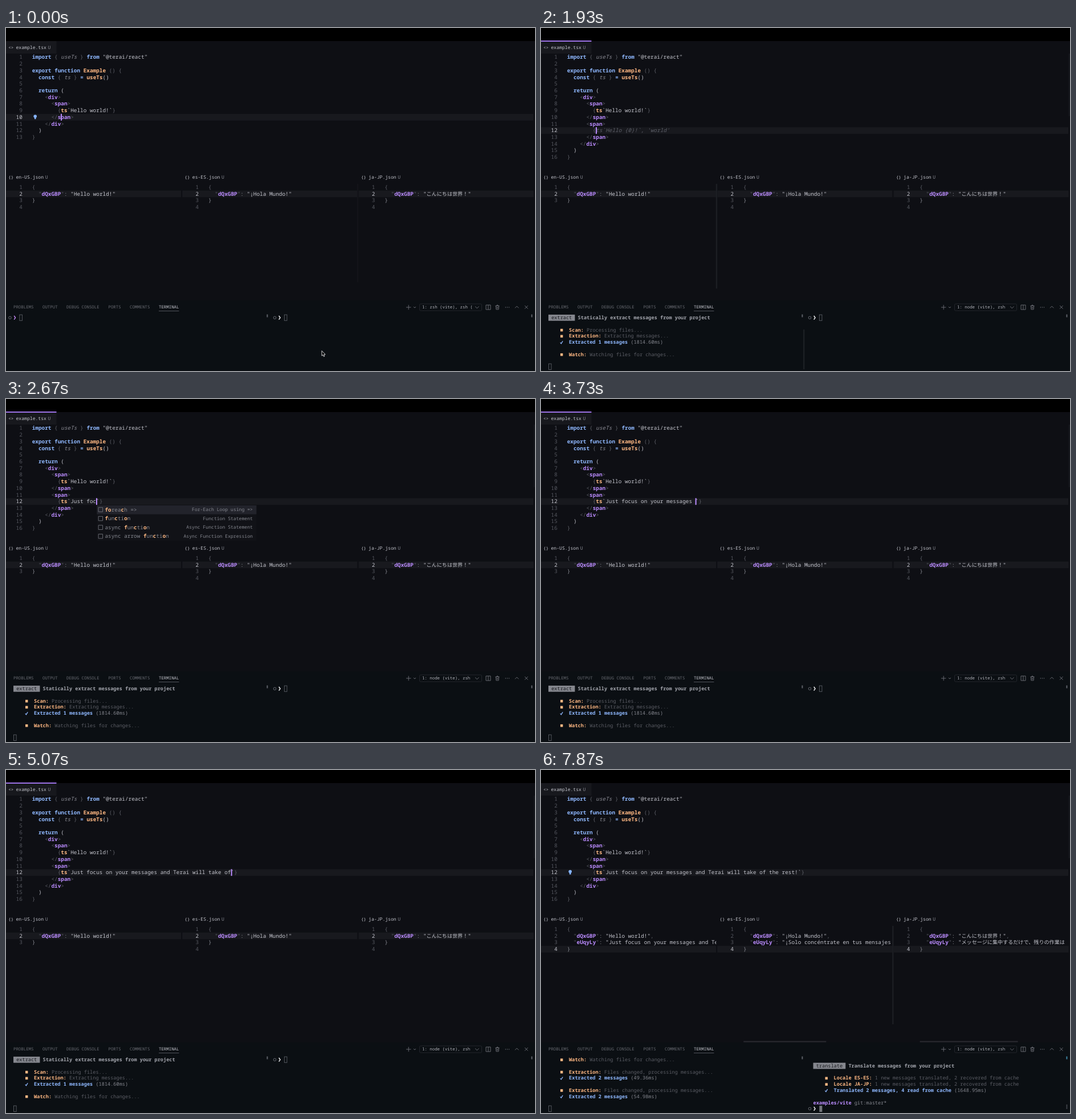
Write an HTML page that moves like this. It is 928 px wide and 603 px high and loops after 8.51 s.

```html
<!DOCTYPE html>
<html lang="en">
<head>
<meta charset="utf-8">
<title>Editor</title>
<style>
  html, body { margin: 0; width: 100%; height: 100%; overflow: hidden; background: #000; }
  svg { display: block; width: 100%; height: 100%; }
  text {
    white-space: pre;
    font-family: "Noto Sans Mono", "Noto Sans CJK JP", "Noto Sans CJK", monospace;
    font-weight: 500;
    text-rendering: geometricPrecision;
  }
  .w { fill: #c3c4cc; }
  .g { fill: #85878f; }
  .d { fill: #5c5e66; }
  .n { fill: #55575f; }
  .i { fill: #8a8b94; font-style: italic; }
  .h { fill: #5d5f68; font-style: italic; }
  .k { fill: #8fb8ff; font-weight: 700; }
  .f { fill: #ffb883; font-weight: 700; }
  .p { fill: #bb8cff; font-weight: 700; }
  .b { fill: #a3a5ad; font-weight: 700; }
  .x { fill: #14161b; }
  .j { fill: #c3c4cc; font-size: 9.1px; font-family: "Noto Sans CJK JP", "Noto Sans CJK", sans-serif; }
  .line { fill: none; stroke: #70727a; stroke-width: .9; }
</style>
</head>
<body>
<svg id="stage" viewBox="0 0 928 603" preserveAspectRatio="none"></svg>
<script>
const LOOP = 8510;
const SIZE = 9.39, CELL = SIZE * .6, LINE = 11.72, CODE_X = 45.7;
const TERM_SIZE = 8.6, TERM_CELL = TERM_SIZE * .6, ROW = 10.77;
const stage = document.getElementById('stage');

const during = (t, from, to = LOOP) => t >= from && t < to;
const esc = s => s.replace(/&/g, '&amp;').replace(/</g, '&lt;');
const rect = (x, y, w, h, fill, more = '') =>
  `<rect x="${x}" y="${y}" width="${w}" height="${h}" fill="${fill}" ${more}/>`;
const path = (d, more = 'class="line"') => `<path d="${d}" ${more}/>`;

// "~k" switches to the style k for the text that follows.
function text(x, y, markup, size = SIZE, more = '') {
  const parts = ('~w' + markup).split(/~(\w)/);
  let spans = '';
  for (let i = 1; i < parts.length; i += 2) {
    const lang = parts[i] === 'j' ? ' lang="ja"' : '';
    if (parts[i + 1]) spans += `<tspan class="${parts[i]}"${lang}>${esc(parts[i + 1])}</tspan>`;
  }
  return `<text x="${x}" y="${y + size * .33}" font-size="${size}" ${more}>${spans}</text>`;
}

// Piecewise linear value through [time, value] points.
function track(points, t) {
  const next = points.findIndex(p => p[0] > t);
  if (next === 0) return points[0][1];
  if (next < 0) return points[points.length - 1][1];
  const [a, b] = [points[next - 1], points[next]];
  return a[1] + (b[1] - a[1]) * (t - a[0]) / (b[0] - a[0]);
}
const typed = (s, from, to, t) =>
  s.slice(0, Math.floor(track([[from, 0], [to, s.length]], t) + 1e-6));

function numberedLine(x, y, n, markup, active) {
  return text(x + 28.8, y, (active ? '~w' : '~n') + n, SIZE, 'text-anchor="end"') +
    text(x + CODE_X, y, markup);
}

function fileLabel(x, y, icon, name) {
  const size = 8.1;
  return text(x + 4.3, y, icon, 7.4) + text(x + 17.5, y, name, size) +
    text(x + 20.1 + name.length * size * .6, y, '~gU', size);
}

const bulb = y => `<circle cx="51.2" cy="${y - 1.6}" r="2.8" fill="#86b5ff"/>` +
  rect(49.9, y, 2.6, 3.4, '#86b5ff');

/* Code editor */
const HEAD = [
  '~kimport ~d{ ~iuseTs ~d} ~kfrom ~w"@terai/react"', '',
  '~kexport function ~fExample ~d() {',
  '  ~kconst ~d{ ~its ~d} ~k= ~fuseTs~w()', '',
  '  ~kreturn ~w(',
  '    ~d<~pdiv~d>',
  '      ~d<~pspan~d>',
  '        ~d{~fts~w`Hello world!`~d}',
  '      ~d</~pspan~d>'
];
const TAIL = ['    ~d</~pdiv~d>', '  ~w)', '~d}'];
const MESSAGE = 'Just focus on your messages and Terai will take of the rest!';
const KEYS = [[2130, 0], [2530, 4], [2670, 8], [2730, 9], [2800, 9], [3670, 26],
  [3730, 28], [3800, 28], [3930, 30], [4000, 30], [4400, 39], [5600, 60]];

const POPUPS = [
  { from: 2670, to: 2730, w: 280, rows: [
    ['~ffo~grea~fc~gh =>', 'For-Each Loop using =>'],
    ['~ff~gun~fc~gti~fo~gn', 'Function Statement'],
    ['~gasync ~ff~gun~fc~gti~fo~gn', 'Async Function Statement'],
    ['~gasync arrow ~ff~gun~fc~gti~fo~gn', 'Async Function Expression']] },
  { from: 3930, to: 4000, w: 288, rows: [
    ['~fan~gonymous', 'Anonymous Function'],
    ['~fa~gsync fu~fn~gction', 'Async Function Statement'],
    ['~fa~gsync arrow fu~fn~gction', 'Async Function Expression'],
    ['~fa~grrow fu~fn~gction', 'Arrow Function'],
    ['~fa~gssig~fn', 'Assignment'],
    ['~fa~gwait the~fn', 'Await Expression']] }
];

function editorState(t) {
  if (t < 1000) return { mid: [], row: 10, col: t < 870 ? 9 : 13 };
  if (t < 1400) {
    const open = typed('<span>', 1000, 1270, t);
    const tag = open.replace(/^<(\w*)/, '~d<~p$1~d') + (open.endsWith('>') ? '~d</~pspan~d>' : '');
    return { mid: ['      ' + tag], row: 11, col: 6 + open.length };
  }
  let body = '', col = 8;
  if (during(t, 1870, 1930)) [body, col] = ['~d{}', 9];
  else if (during(t, 1930, 2000)) [body, col] = ["~d{~hts`Hello {0}!`, 'world'", 9];
  else if (during(t, 2000, 2070)) [body, col] = ['~d{~ft~d}', 10];
  else if (during(t, 2070, 2130)) [body, col] = ['~d{~fts~d}', 11];
  else if (t >= 2130) {
    const said = MESSAGE.slice(0, Math.floor(track(KEYS, t) + 1e-6));
    [body, col] = ['~d{~fts~w`' + said + '`~d}', 12 + said.length];
  }
  return { mid: ['      ~d<~pspan~d>', '        ' + body, '      ~d</~pspan~d>'], row: 12, col };
}

function popup({ w, rows }, x) {
  const step = 15.6, top = 187;
  return rect(x, top, w, rows.length * step, '#111217') + rect(x, top, w, step, '#22232b') +
    rows.map(([label, detail], i) => {
      const y = top + 7.5 + i * step;
      return path(`M${x + 2.8} ${y - 3.8}h7.4v7.6h-7.4z`) + text(x + 14, y, label) +
        text(x + w - 6.5, y, '~g' + detail, 8.1, 'text-anchor="end"');
    }).join('');
}

function editor(t) {
  const { mid, row, col } = editorState(t);
  const lineY = n => 51.3 + (n - 1) * LINE;
  const cursorX = CODE_X + col * CELL, y = lineY(row);
  const focused = during(t, 870, 6070);
  let out = rect(0, 23, 88.5, 22, '#17181d') + (focused ? rect(0, 22, 88.5, 2, '#9d72e8') : '') +
    fileLabel(0, 34.5, '<>', 'example.tsx') +
    rect(0, y - 5.8, 925, LINE, '#18191e');
  [...HEAD, ...mid, ...TAIL].forEach((code, i) => {
    out += numberedLine(0, lineY(i + 1), i + 1, code, i + 1 === row);
  });
  if (t < 870 || t >= 5800) out += bulb(y);
  if (t < 6400) out += rect(cursorX - .4, y - 5.9, 2, 11.8, '#bb8cff');
  if (t >= 1000) out += rect(925.5, 45, 2.5, 110, '#15171c');
  const shown = POPUPS.find(p => during(t, p.from, p.to));
  return out + (shown ? popup(shown, cursorX + 1) : '');
}

/* Translation files */
const FILES = [
  { x: 0, name: 'en-US', hello: '~w"Hello world!"', right: 307.5, bar: 156, at: 5870, trim: 1800,
    extra: '~w"Just focus on your messages and Terai will take of the rest!"' },
  { x: 309.3, name: 'es-ES', hello: '~w"¡Hola Mundo!"', right: 615.5, bar: 145, at: 7670, trim: LOOP,
    extra: '~w"¡Solo concéntrate en tus mensajes y Terai se encargará del resto!"' },
  { x: 618.6, name: 'ja-JP', hello: '~w"~jこんにちは世界！~w"', right: 920, bar: 172, at: 7670, trim: LOOP,
    extra: '~w"~jメッセージに集中するだけで、残りの作業は自動です' }
];
const entry = (key, value) => `  ~d"~p${key}~d"~g: ${value}`;

function jsonPane(file, i, t) {
  const { x, name, hello, right, at, extra, trim, bar } = file;
  const full = t >= at;
  const lines = full
    ? ['~d{', entry('dQxGBP', hello) + '~d,', entry('eUqyLy', extra), '~g}']
    : ['~d{', entry('dQxGBP', hello), '~g}', ''];
  if (!full && t >= trim) lines.pop();
  const active = full ? 4 : 2, lineY = n => 279.8 + (n - 1) * LINE;
  let out = fileLabel(x, 262.8, '{}', name + '.json') +
    rect(x, lineY(active) - 5.8, 307, LINE, '#18191e') +
    `<clipPath id="pane${i}"><rect x="${x}" y="270" width="${right - x}" height="60"/></clipPath>` +
    `<g clip-path="url(#pane${i})">` +
    lines.map((code, n) => numberedLine(x, lineY(n + 1), n + 1, code, n + 1 === active)).join('') + '</g>';
  const barX = x + 306.8, grey = '#1c1e23';
  if (i === 0 && during(t, 1800, 2200)) out += rect(barX, 274, 2.4, 184, grey);
  if (full && (i > 0 || t < 6600)) {
    if (i < 2) out += rect(barX, 274, 2.4, 173, grey);
    out += rect(x + 46, 476.5, bar, 2, '#2a2b31');
  }
  if (i === 1 && t < 400) out += rect(barX, 274, 2, 173, '#14151a');
  return out;
}

/* Terminals: [start, markup, end]; only the last nine rows are visible */
const again = (t, ms) => [
  [t, '■~fExtraction: ~dFiles changed, processing messages...'],
  [t + 60, `✔~kExtracted 2 messages ~g(${ms}ms)`], [t + 60, '']];
const title = (tag, rest) => ({ tag, rest });
const LEFT = [
  [470, ''], [530, title(' extract ', 'Statically extract messages from your project')], [530, ''],
  [600, '■~fScan: ~dProcessing files...'],
  [730, '■~fExtraction: ~dExtracting messages...'],
  [1730, '✔~kExtracted 1 messages ~g(1814.60ms)'], [1730, ''],
  [1800, '■~fWatch: ~dWatching files for changes...'], [1800, ''],
  ...again(5870, '49.36'), ...again(6000, '54.98')
];
const cached = '~d1 new messages translated, 2 recovered from cache';
const RIGHT = [
  [6670, ''], [7200, title(' translate ', 'Translate messages from your project')], [7200, ''],
  [7200, '■~fLocale ES-ES: ~dTranslating messages...', 7670],
  [7200, '■~fLocale JA-JP: ~dTranslating messages...', 7670],
  [7670, '■~fLocale ES-ES: ' + cached], [7670, '■~fLocale JA-JP: ' + cached],
  [7730, '✔~kTranslated 2 messages, 4 read from cache ~g(1648.95ms)'], [7730, ''],
  [7800, '~pexamples/vite ~ggit:master*'], [7800, '❯']
];

function termRow(x, y, item, chevron) {
  const at = (col, markup) => text(x + col * TERM_CELL, y, markup, TERM_SIZE);
  if (item.tag) {
    const n = item.tag.length;
    return rect(x, y - 5.4, n * TERM_CELL, 10.8, '#85878e') + at(0, '~x' + item.tag) + at(n + 1, '~b' + item.rest);
  }
  const rest = item.slice(1);
  switch (item[0]) {
    case '■': return rect(x + 21, y - 2, 4.4, 4.6, '#ffb883') + at(7, rest);
    case '✔': return path(`M${x + 20.8} ${y + .5}l1.6 1.9l2.8-4.4`, 'fill="none" stroke="#8fb8ff" stroke-width="1.3"') + at(7, rest);
    case '❯': return `<circle class="line" cx="${x - 6}" cy="${y}" r="2.3"/>` +
      path(`M${x + 1.2} ${y - 3.4}l2.3 3.4l-2.3 3.4`, `fill="none" stroke="${chevron}" stroke-width="1.5"`) + at(2, rest);
  }
  return at(0, item);
}

function terminal(t, { x, log, command, from, to, chevron, focused, busy, done }) {
  const entered = typed(command, from, to, t);
  const rows = ['❯~w' + entered, ...log.filter(l => during(t, l[0], l[2])).map(l => l[1])];
  const prompt = rows[rows.length - 1];
  const atPrompt = prompt[0] === '❯';
  if (!atPrompt) rows.push('');
  const shown = rows.slice(-9), rowY = i => 509.3 + i * ROW;
  let out = shown.map((r, i) => termRow(x, rowY(i), r, chevron)).join('');
  if (!during(t, busy, done)) {
    const col = atPrompt ? 2 + (rows.length === 1 ? entered.length : 0) : 0;
    const cx = x + col * TERM_CELL + .5, cy = rowY(shown.length - 1) - 5.2;
    out += focused ? rect(cx, cy, 5, 10.8, '#74767d')
      : rect(cx, cy, 4.6, 10.2, 'none', 'stroke="#5a5d64" stroke-width=".9"');
  }
  return out;
}

/* Bottom panel */
const TABS = [['PROBLEMS', 13], ['OUTPUT', 64], ['DEBUG CONSOLE', 106], ['PORTS', 179.5],
  ['COMMENTS', 217], ['TERMINAL', 268]];
const TOOLS =
  path('M702 491h8.4M706.2 486.8v8.4M715 490l2 2l2-2M823 489.5l3.3 3.2l3.3-3.2') +
  path('M842 487h8v8h-8zM846 487v8M858.5 488.5h7M859.4 488.5l.5 6.3h4.2l.5-6.3M861 488.5v-1.4h2v1.4M861.2 490.4v2.8M862.8 490.4v2.8') +
  path('M893 492.3l3.2-3.2l3.2 3.2M910 488l5.6 5.6M915.6 488l-5.6 5.6') +
  [876.4, 879.4, 882.4].map(x => `<circle cx="${x}" cy="491" r=".7" fill="#70727a"/>`).join('');

function panel(t) {
  let shell = '1: node (vite), zsh';
  if (t < 400) shell = '1: zsh (vite), zsh (';
  else if (during(t, 6670, 7800)) shell = '1: node (vite), node';
  let out = rect(0, 479, 928, 124, '#0b0f13') +
    TABS.map(([name, x]) => text(x, 491, (name === 'TERMINAL' ? '~w' : '~g') + name, 7.4,
      name === 'TERMINAL' ? '' : 'opacity=".75"')).join('') +
    rect(268, 497, 35.5, 1, '#50525a') +
    rect(725.5, 485, 109, 12, 'none', 'rx="2" stroke="#22252b"') +
    text(730, 491, shell, 7.4, 'opacity=".9"') + TOOLS +
    rect(457.4, 503.5, 2, 5, '#5d6067') +
    rect(921.4, 503.5, 2, 5, t >= 7800 ? '#3d83a0' : '#5d6067');
  if (t >= 7800) out += rect(921.4, 588, 2, 8, '#3b3e44');
  if (during(t, 1800, 2200)) out += rect(460, 530, 2.4, 70, '#1c2024');
  return out +
    terminal(t, { x: 13, log: LEFT, command: 'pnpm run extract', from: 0, to: 400,
      chevron: '#c58af5', focused: during(t, 70, 870), busy: 530, done: 1800 }) +
    terminal(t, { x: 477.5, log: RIGHT, command: 'pnpm run translate', from: 6130, to: 6600,
      chevron: '#f2f3f5', focused: t >= 6200, busy: 7200, done: 7800 });
}

function pointer(t) {
  if (t >= 930) return '';
  const u = track([[330, 0], [730, 1]], t), e = u * u * (3 - 2 * u);
  return path('M0 0V8.8L2 7L3.4 10.2L4.9 9.5L3.6 6.5H6.2Z',
    `transform="translate(${554 - 182 * e} ${567.5 - 415 * e})" fill="#000" stroke="#e8e8ea" stroke-width=".9"`);
}

const scene = t => rect(0, 0, 928, 603, '#000') + rect(0, 23, 928, 580, '#0e0f14') +
  FILES.map((file, i) => jsonPane(file, i, t)).join('') + editor(t) + panel(t) + pointer(t);

// The picture advances fifteen times a second, on times rounded to 10 ms.
let last = -1;
function tick(now) {
  const step = Math.floor((now % LOOP + 5) * 15 / 1000);
  const t = Math.round(step * 20 / 3) * 10;
  if (t !== last) stage.innerHTML = scene(last = t);
  requestAnimationFrame(tick);
}
tick(performance.now());
</script>
</body>
</html>
```
